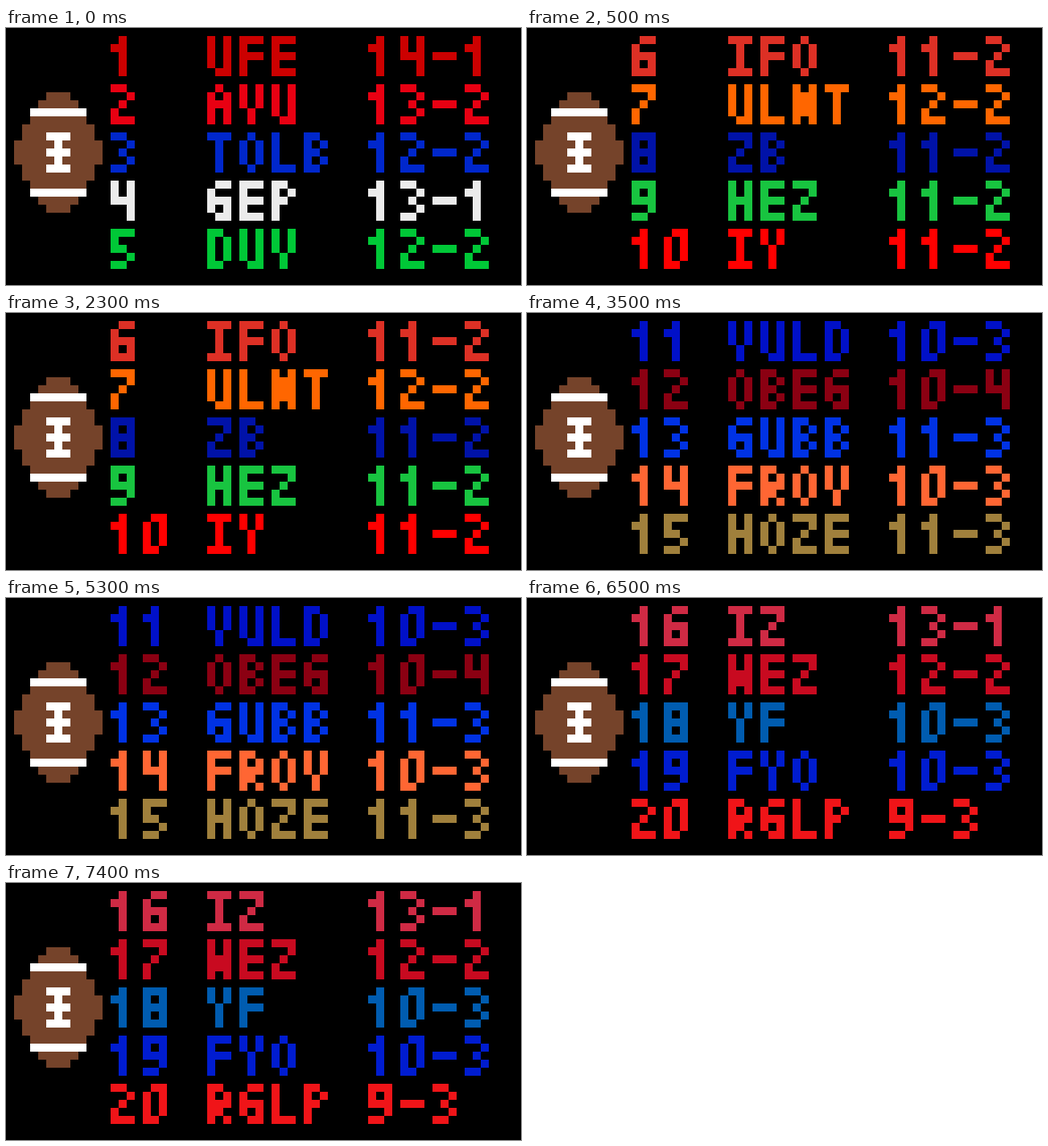
An HTML page for the animation above (8000 ms loop, 640 by 320 pixels).

```html
<!DOCTYPE html>
<html lang="en">
<head>
<meta charset="utf-8">
<title>Top 20</title>
<style>
html, body { margin: 0; width: 100%; height: 100%; overflow: hidden; background: #000; }
svg { display: block; width: 100vw; height: 100vh; }
</style>
</head>
<body>
<svg id="stage" viewBox="0 0 64 32" shape-rendering="crispEdges">
  <rect width="64" height="32" fill="#000"/>
  <g id="ball"></g>
  <g id="board" transform="translate(.5 .5)" fill="none" stroke-width="1" stroke-linecap="square"></g>
</svg>
<script>
const NS = 'http://www.w3.org/2000/svg';
const LOOP = 8000, HOLD = 3000, LEAD = 2500;

function add(parent, tag, attrs) {
  const el = document.createElementNS(NS, tag);
  for (const k in attrs) el.setAttribute(k, attrs[k]);
  return parent.appendChild(el);
}

// Strokes shared by the letters, on a grid of 3 by 5 cells
const strokes = {
  L: 'M0 0V4', C: 'M1 0V4', R: 'M2 0V4',
  T: 'M0 0H2', M: 'M0 2H2', B: 'M0 4H2',
  t: 'M0 0H1', i: 'M0 1H1', m: 'M0 2H1', g: 'M0 3H1', b: 'M0 4H1',
  p: 'M1 0H2', w: 'M1 4H2',
  l: 'M0 1V3', v: 'M1 1V3', r: 'M2 1V3',
  k: 'M0 0V2', e: 'M2 0V2', f: 'M0 0V1', h: 'M2 0V1',
  a: 'M1 2V3', j: 'M1 2V4', q: 'M0 3V4', s: 'M1 3V4', z: 'M2 3V4',
  o: 'M1 0h0', c: 'M1 2h0', n: 'M1 4h0',
  u: 'M2 1h0', d: 'M2 3h0', x: 'M2 4h0'
};

const glyphs = {
  0: 'prlb', 1: 'Ci', 2: 'tucqB', 3: 'tucdb', 4: 'kMR',
  5: 'Tkmdb', 6: 'plMdB', 7: 'Tucq', 8: 'TLMBR', 9: 'TkMrb',
  A: 'olqMrz', B: 'tLmbud', D: 'tLbr', E: 'TLMB', F: 'TLM', G: 'plMzw',
  H: 'LMR', I: 'TCB', L: 'LB', N: 'LRv', O: 'olrn', P: 'Ltmu',
  R: 'LtuMgx', T: 'TC', U: 'klRw', V: 'kes', W: 'LRa', Y: 'fhj',
  Z: 'TucqB', '-': 'M'
};

const pages = [
  ['UFE 14-1 #cc0000', 'AVU 13-2 #e80012', 'TOLB 12-2 #0027cc', 'GEP 13-1 #ebebeb', 'DUV 12-2 #00c837'],
  ['IFO 11-2 #dd3025', 'ULNT 12-2 #ff6600', 'ZB 11-2 #0012a8', 'HEZ 11-2 #18c440', 'IY 11-2 #ff0000'],
  ['VULD 10-3 #0010c8', 'OBEG 10-4 #8b0012', 'GUBB 11-3 #0032e4', 'FROV 10-3 #ff6633', 'HOZE 11-3 #a0803c'],
  ['IZ 13-1 #cf2a44', 'WEZ 12-2 #c80a20', 'YF 10-3 #005cb0', 'FYO 10-3 #001cd0', 'RGLP 9-3 #f01418']
];

function write(parent, text, x, y) {
  [...text].forEach((ch, i) => add(parent, 'path', {
    d: [...glyphs[ch]].map(s => strokes[s]).join(''),
    transform: `translate(${x + i * 4} ${y})`
  }));
}

function drawBall(g) {
  const bar = (half, y, h, fill) =>
    add(g, 'rect', { x: 6.5 - half, y, width: half * 2, height: h, fill });
  const brown = '#75432a', white = '#fff';
  bar(1.5, 8, 15, brown);
  bar(2.5, 9, 13, brown);
  bar(3.5, 10, 11, brown);
  bar(4.5, 12, 7, brown);
  bar(5.5, 14, 3, brown);
  for (const y of [10, 20]) bar(3.5, y, 1, white);
  bar(0.5, 13, 5, white);
  for (const y of [13, 15, 17]) bar(1.5, y, 1, white);
}

drawBall(document.getElementById('ball'));

const board = document.getElementById('board');
const views = pages.map((rows, p) => {
  const view = add(board, 'g', {});
  rows.forEach((row, i) => {
    const [team, record, color] = row.split(' ');
    const rank = String(p * rows.length + i + 1);
    const y = 1 + i * 6;
    const line = add(view, 'g', { stroke: color, role: 'img', 'aria-label': `${rank} ${team} ${record}` });
    write(line, rank, 13, y);
    write(line, team, 25, y);
    write(line, record, 45, y);
  });
  return view;
});

function render(time) {
  const page = Math.floor((time % LOOP + LEAD) / HOLD);
  views.forEach((view, i) => view.setAttribute('display', i === page ? 'inline' : 'none'));
}

const start = performance.now();
function tick() {
  render(performance.now() - start);
  requestAnimationFrame(tick);
}
tick();
</script>
</body>
</html>
```
